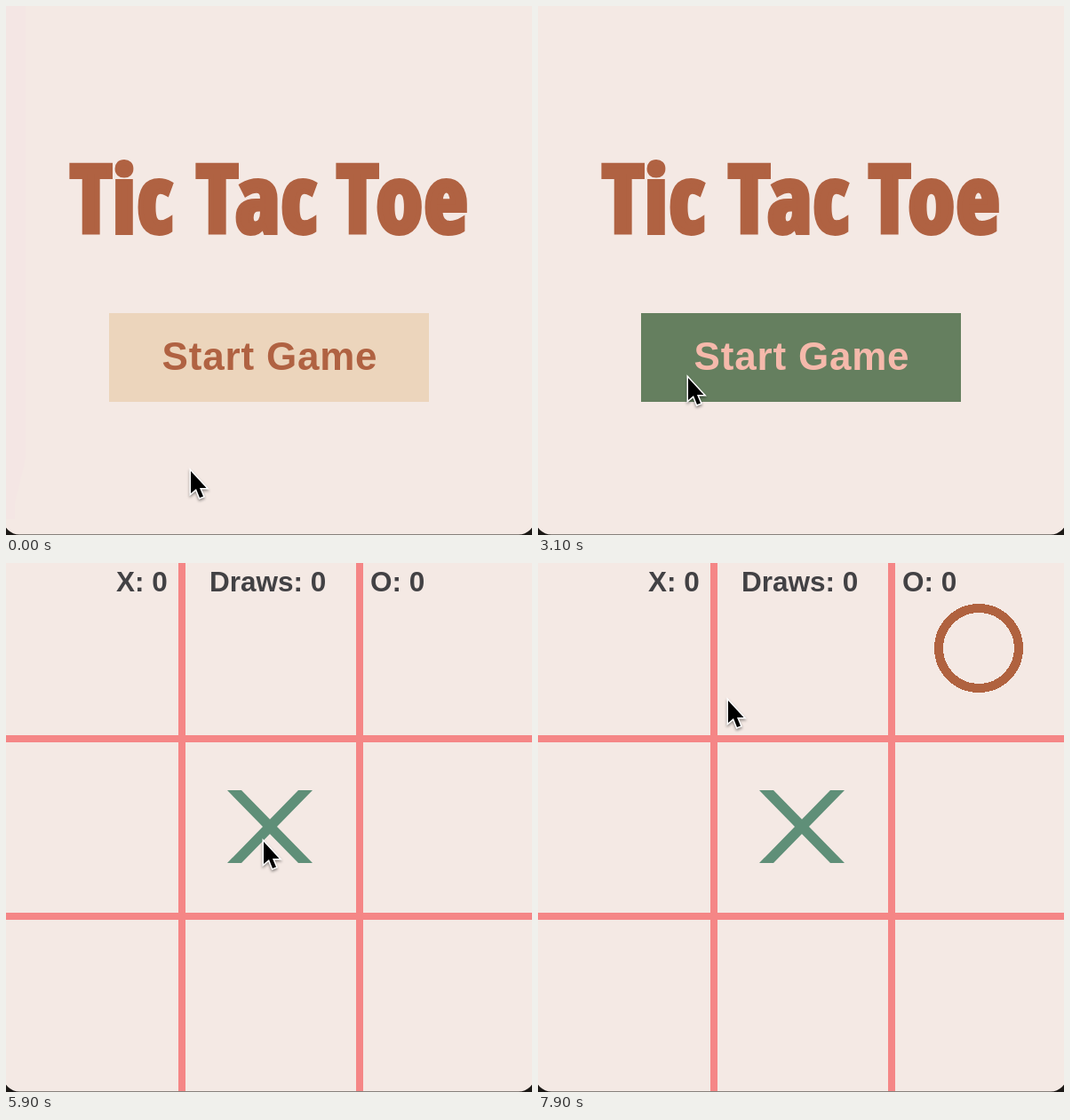
Recreate the animation shown at these times as an HTML page. Size 592 by 596 pixels, loop 8000 ms.

```html
<!DOCTYPE html>
<html lang="en">
<head>
<meta charset="utf-8">
<title>Tic Tac Toe</title>
<style>
  html, body { margin: 0; width: 100%; height: 100%; overflow: hidden; background: #1b1815; }
  svg { display: block; width: 592px; height: 596px; }
  text { font-family: "Liberation Sans", Arial, sans-serif; font-weight: 700; }
  #title text {
    font: 800 105px Impact, "Open Sans Condensed", "Open Sans", sans-serif;
    font-stretch: 75%; letter-spacing: 2px;
    fill: #b06242; stroke: #b06242; stroke-width: 6px;
  }
  #button rect { fill: #ecd5bc; }
  #button text { font-size: 44px; letter-spacing: .8px; fill: #b06242; }
  #button.hover rect { fill: #657f5f; }
  #button.hover text { fill: #f5b9ab; }
  #score text { font-size: 31.5px; fill: #424144; }
  #cursor { filter: drop-shadow(0 2px 1.5px #0006); }
</style>
</head>
<body>
<svg viewBox="0 0 592 596">
  <rect x="-3" y="-40" width="598" height="635.5" rx="18" fill="#f4e9e4"/>

  <g id="menu">
    <path id="band" d="M0 0H22V510L10 560V578H0Z" fill="#f4e6e4"/>
    <g id="title">
      <text x="73" y="255">Tic</text>
      <text x="215" y="255">Tac</text>
      <text x="373" y="255">Toe</text>
    </g>
    <g id="button">
      <rect x="116" y="346" width="360" height="100"/>
      <text x="297" y="410" text-anchor="middle">Start Game</text>
    </g>
  </g>

  <g id="board" visibility="hidden">
    <path d="M198 0V595M398 0V595M0 198H592M0 398H592" stroke="#f58686" stroke-width="8"/>
    <g id="score">
      <text x="124" y="32">X: 0</text>
      <text x="229" y="32">Draws: 0</text>
      <text x="410" y="32">O: 0</text>
    </g>
    <path id="cross" d="M249 256H265L345 338H329ZM329 256H345L265 338H249Z" fill="#5f8f78"/>
    <circle id="nought" cx="496" cy="96" r="45" fill="none" stroke="#b0623f" stroke-width="10" shape-rendering="crispEdges"/>
  </g>

  <g id="cursor">
    <path d="M1 3V28L7 23L11 33L15 31.5L11 22H18.5Z" stroke="#fff" stroke-width="3" paint-order="stroke"/>
  </g>
</svg>
<script>
  const LOOP = 8000, STEP = 100;
  const BOARD_AT = 4300, CROSS_AT = 5900, NOUGHT_AT = 7300;
  const BUTTON_BOTTOM = 446;

  const home = { x: 207, y: 521 };
  const moves = [
    { start: 800, time: 600, x: 180, y: 504 },
    { start: 1400, time: 900, x: 168, y: 416 },
    { start: 4800, time: 600, x: 289, y: 311 },
    { start: 5900, time: 600, x: 375, y: 204 },
    { start: 6700, time: 300, x: 450, y: 141 },
    { start: 7600, time: 300, x: 213, y: 152 }
  ];

  const el = id => document.getElementById(id);
  const show = (id, on) => el(id).setAttribute("visibility", on ? "inherit" : "hidden");
  const clamp = v => Math.min(1, Math.max(0, v));
  const easeOut = p => 1 - (1 - p) ** 2;

  // Each move pulls the pointer from wherever the previous ones left it
  function pointer(t) {
    return moves.reduce((at, move) => {
      const k = easeOut(clamp((t - move.start) / move.time));
      return { x: at.x + (move.x - at.x) * k, y: at.y + (move.y - at.y) * k };
    }, home);
  }

  function draw(now) {
    const t = Math.floor(now % LOOP / STEP) * STEP;
    const { x, y } = pointer(t);
    const hover = y < BUTTON_BOTTOM;
    el("cursor").setAttribute("transform", `translate(${x} ${y})`);
    el("button").classList.toggle("hover", hover);
    show("menu", t < BOARD_AT);
    show("band", t < BOARD_AT && !hover);
    show("board", t >= BOARD_AT);
    show("cross", t >= CROSS_AT);
    show("nought", t >= NOUGHT_AT);
    requestAnimationFrame(draw);
  }
  requestAnimationFrame(draw);
</script>
</body>
</html>
```
